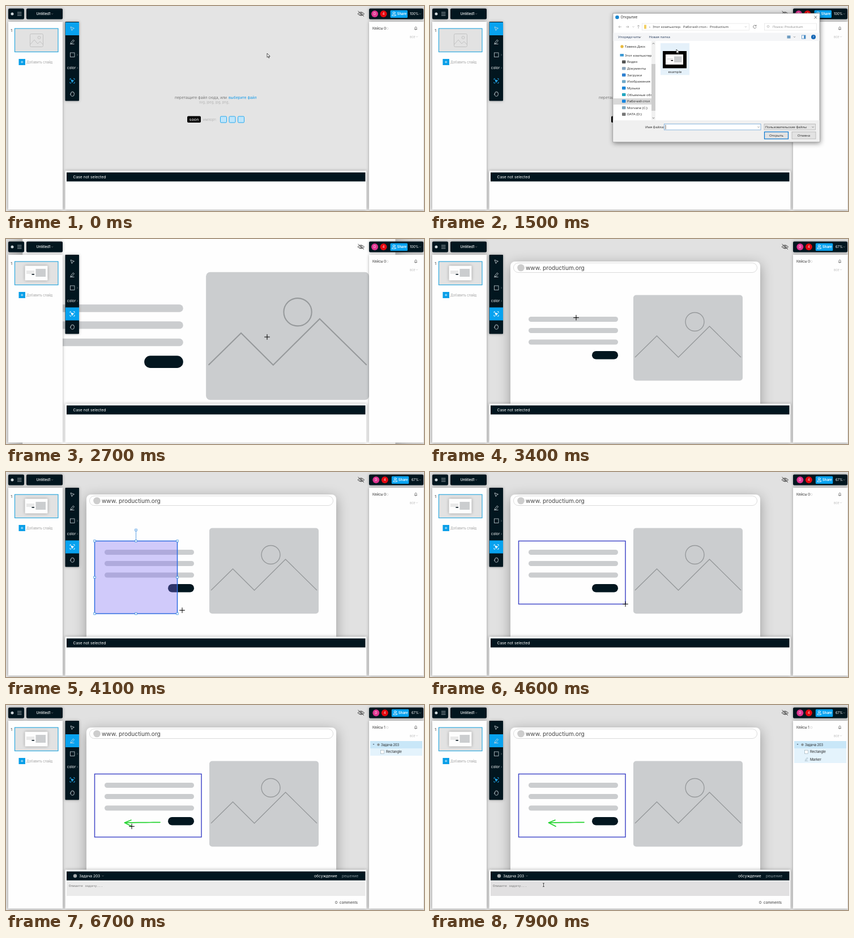
Animation, 738 px wide and 364 px high, one loop 8000 ms. Source, as an HTML page:

```html
<!DOCTYPE html>
<html lang="ru">
<head>
<meta charset="utf-8">
<title>Design review</title>
<style>
html, body { margin: 0; width: 100%; height: 100%; overflow: hidden; background: #e4e4e4; }
svg { display: block; width: 738px; height: 364px; font-family: Inter, Roboto, sans-serif; }
text { white-space: pre; }
#dialog { font-family: "Open Sans", "Noto Sans", sans-serif; }
.mono { font-family: "Liberation Mono", "DejaVu Sans Mono", monospace; }
.panel { filter: drop-shadow(0 0 2.5px rgba(0,0,0,.32)); }
.board { filter: drop-shadow(0 5px 11px rgba(0,0,0,.32)); }
.window { filter: drop-shadow(1px 2px 4px rgba(0,0,0,.45)); }
</style>
</head>
<body>
<svg id="stage" viewBox="0 0 738 364"></svg>
<script>
const LOOP = 8000, STEP = 100;
const DARK = '#02161f', BLUE = '#08a2ef', GREY = '#cbcdcf', INK = '#222', ICON = '#d3dadd';

// Markup helpers; text is placed by its vertical centre.
const rect = (x, y, w, h, fill, more = '') =>
  `<rect x="${x}" y="${y}" width="${w}" height="${h}" fill="${fill}" ${more}/>`;
const dot = (x, y, r, fill, more = '') =>
  `<circle cx="${x}" cy="${y}" r="${r}" fill="${fill}" ${more}/>`;
const line = (d, stroke = ICON, width = .8, more = '') =>
  `<path d="${d}" fill="none" stroke="${stroke}" stroke-width="${width}" ${more}/>`;
const text = (x, y, s, size, fill = INK, more = '') =>
  `<text x="${x}" y="${y + size * .36}" font-size="${size}" fill="${fill}" ${more}>${s}</text>`;
const group = (id, body, more = '') => `<g id="${id}" ${more}>${body}</g>`;
const chevron = (x, y, c = '#999') => line(`M${x - 1.5} ${y - .8}l1.5 1.5 1.5-1.5`, c, .6);
const MID = 'text-anchor="middle"';

function picture() {
  const bars = [142.5, 162.5, 183].map(y => rect(174, y - 4.5, 158, 9, GREY, 'rx="4.5"')).join('');
  return rect(142, 40, 441, 285, '#fefefe', 'rx="8" class="board"') +
    rect(147.5, 42.5, 430, 17, '#fff', 'rx="8.5" stroke="#c4c4c4" stroke-width=".6"') +
    dot(160.5, 51, 6.3, '#cdcdcd') +
    text(169, 51, 'www. productium.org', 10.2, '#444') +
    bars + rect(286, 199, 46, 14.5, DARK, 'rx="7.2"') +
    rect(359, 99.5, 193, 152, GREY, 'rx="5"') +
    dot(467.5, 147, 16.5, 'none', 'stroke="#96999b" stroke-width="1.4"') +
    line('M362 210L400.5 172 438.5 210 493.5 155 549 210', '#96999b', 1.4);
}

function dropZone() {
  const marks = [378, 393.5, 409].map(x =>
    rect(x + .5, 196, 11, 11, '#bfe5fa', 'rx="1.5" stroke="#25a9ef"')).join('');
  return text(298, 162.5, 'перетащите файл сюда, или', 6.7, '#777') +
    text(393, 162.5, 'выберите файл', 6.7, '#159bea') +
    text(341, 170.5, 'svg, jpeg, jpg, png,', 5.9, '#b5b5b5') +
    rect(320, 195.5, 24, 11.5, '#000', 'rx="2"') +
    text(332, 201, 'soon', 7.3, '#fff', MID) +
    text(348, 201.5, 'импорт:', 6.2, '#b4b4b4') + marks;
}

function topBars() {
  const bar = (x, w) => rect(x, 4.5, w, 19, DARK, 'rx="2"');
  return `<g class="panel">${bar(4, 28)}${bar(36, 64)}${bar(641, 96)}</g>` +
    dot(11, 14, 2.5, '#cfd7db') +
    line('M20 11.2h7.5M20 14h7.5M20 16.8h7.5', '#dce3e6', .7) +
    text(53.5, 14, 'Untitled1', 6, '#fff', 'font-weight="500"') + chevron(81.5, 14) +
    line('M621 14q5.5-6.5 11.5 0q-5.5 6-11.5 0M621.5 9l10.5 9.5', '#333', .9) +
    dot(626.8, 14, 2, 'none', 'stroke="#333" stroke-width=".8"') +
    group('team', dot(651, 14, 6, '#df3390') + text(651, 14, 'D', 5.5, '#fff', MID) +
      dot(666.5, 14, 6, '#e5080f') + text(666.5, 14, '4', 5.5, '#fff', MID) +
      rect(678.5, 7.5, 30.5, 13.5, BLUE, 'rx="1.5"') +
      dot(684.5, 12, 1.6, 'none', 'stroke="#fff" stroke-width=".8"') +
      line('M681.5 17.3q0-2.8 3-2.8t3 2.8zM686.5 10.5q2 1 .4 3M687.6 14.8q1.2.8 1.2 2.4', '#fff') +
      text(690.5, 14, 'Share', 6, '#fff', 'font-weight="600"')) +
    text(713, 14, '100%', 5.8, '#fff', 'id="zoomLabel"') + chevron(731, 14);
}

function slides() {
  return rect(4, 28, 96, 333.5, '#fefefe', 'class="panel"') +
    text(8.3, 43.5, '1', 6.8, '#333') +
    rect(15.5, 40, 76.5, 41.5, '#e2e2e2', 'stroke="#2da9df" stroke-width="1.2"') +
    group('emptyThumb', rect(42.5, 49.5, 23, 23, 'none', 'rx="2" stroke="#c2c2c2"') +
      line('M43 68l7-8 6 7 4-4 5 5', '#c2c2c2', 1) + dot(58.5, 56, 2.4, 'none', 'stroke="#c2c2c2"')) +
    group('fullThumb', rect(33.5, 47.5, 40, 26, '#fdfdfd', 'rx="1" class="panel"') +
      rect(52.5, 53, 17.5, 14, GREY) +
      line('M36 57h14M36 59h14M36 61h14', '#c9c9c9', .8) + rect(45.5, 62, 4.5, 1.6, DARK)) +
    rect(22.5, 94, 11.5, 11, '#0a9fe8') + line('M26 99.5h4.5M28.2 97.2v4.5', '#fff', .7) +
    text(36, 99.7, 'Добавить слайд', 5.8, '#a3a3a3');
}

function tools() {
  const arrow = (x, y) => `M${x} ${y}l6.5 2.6-2.9 1.2-1.2 2.9z`;
  return rect(104.5, 28, 24.5, 140.5, DARK, 'class="panel" rx="1"') +
    rect(105, 29, 24, 23, BLUE, 'id="activeTool"') +
    line(arrow(114, 37)) +
    line('M114.5 65l4-5 2 1.5-4 5-2.3.6zM113 67.5h7.5') +
    rect(113.5, 83, 7.5, 7.5, 'none', 'stroke="#c8d0d4" stroke-width=".8"') +
    line('M125.2 85.3l1.5 1.5-1.5 1.5', '#8d999e', .6) +
    text(107.7, 110, 'color', 6.5, '#fff') + line('M125.2 108.5l1.5 1.5-1.5 1.5', '#8d999e', .6) +
    group('regionTool', line('M113 131v-2h2M119 129h2v2M121 135v2h-2M115 137h-2v-2', 'currentColor', .9) +
      `<path d="${arrow(114.3, 130.2)}" fill="currentColor"/>`) +
    line('M114.5 157v-3q.8-1 1.4 0v-1.5q.8-1 1.5 0q.8-1 1.4 0v1.5q.9-1 1.5 0v3q0 3.2-2.5 3.2h-1.6q-1.2-.3-3-3.5q.2-1 1.3.3');
}

function cases() {
  return rect(641, 28, 96.5, 333.5, '#fefefe', 'class="panel"') +
    text(647, 40, 'Кейсы 0', 6, '#333', 'id="caseCount"') +
    dot(673.3, 40, 1.8, 'none', 'stroke="#ccc" stroke-width=".6"') +
    line('M721 41.5h5M722 41v-3q1.5-2.5 3 0v3M723 42.5h1', '#555', .7) +
    text(713, 54.5, 'все', 5.6, '#bbb') + chevron(725.5, 54.5, '#bbb') +
    group('caseRows', rect(643, 64, 92, 13, '#c9e7f8') + rect(643, 77, 92, 13, '#e4f3fc') +
      '<path d="M647.5 69h3l-1.5 2z" fill="#567"/>' + dot(657.5, 70.5, 2.2, '#8b9499') +
      text(662, 70.5, 'Задача 203', 5.7) +
      rect(661.5, 80.2, 6, 6, '#fff', 'stroke="#8fa4b0" stroke-width=".6"') +
      text(671, 83.3, 'Rectangle', 5.9)) +
    group('markerRow', rect(643, 90, 92, 13, '#e4f3fc') +
      line('M662.5 97.5l3.2-4 1.3 1-3.2 4zM661.5 99.3h6', '#8fa4b0', .6) +
      text(671, 96.5, 'Marker', 5.9));
}

function casePanel() {
  return rect(104.5, 292.5, 532, 69, '#fefefe', 'class="panel"') +
    rect(107, 295.5, 527.5, 16, DARK) +
    group('noCase', text(118.5, 303.5, 'Case not selected', 6.8, '#fff')) +
    group('withCase', dot(122, 303.5, 3.2, '#a6abad') +
      text(129, 303.5, 'Задача 203', 6.6, '#fff') + chevron(171, 303.5) +
      text(544, 303.5, 'обсуждение', 6.7, '#fff') + text(593, 303.5, 'решение', 6.7, '#87949a') +
      rect(107, 313, 527.5, 26, '#ebebeb', 'id="field"') +
      text(111, 321, 'Опишите задачу...', 5.9, '#777', 'class="mono"') +
      text(581, 350.5, '0  comments', 6.5, '#333'));
}

function dialog() {
  const places = ['Видео', 'Документы', 'Загрузки', 'Изображения', 'Музыка', 'Объемные объ',
    'Рабочий стол', 'Morvane (C:)', 'DATA (D:)'];
  const tints = ['#555', '#8aa5bd', '#2f80d0', '#6fa8c8', '#1d86d8', '#22a6c0', '#1685e0', '#7fa6bd', '#777'];
  const tree = places.map((name, i) => {
    const y = 99.3 + i * 11.62;
    return rect(339, y - 2.7, 6.5, 5.4, tints[i], 'rx="1"') + text(348, y, name, 6.1);
  }).join('');
  const crumb = (x, s) => text(x, 37, s, 6.1, '#333');
  const button = (x, s, more) => rect(x, 223.5, 42, 12.5, '#e2e2e2', more) + text(x + 21, 229.7, s, 6, INK, MID);
  return rect(323, 13, 365, 228.5, '#fff', 'class="window" stroke="#888" stroke-width=".7"') +
    dot(330.5, 20, 3.3, '#1a86cf') + text(336.5, 20, 'Открытие', 6.2) +
    line('M678.5 17.5l4.5 5M683 17.5l-4.5 5', '#333', .7) +
    line('M338 37h-5l2-2m-2 2l2 2M346 37h5l-2-2m2 2l-2 2M368 40v-6l-2 2m2-2l2 2', '#999', .7) +
    chevron(359, 37) +
    rect(374.5, 31, 189, 12, '#fff', 'stroke="#ddd" stroke-width=".6"') + rect(378, 33.5, 4, 7, '#f2cf62') +
    crumb(387, '›') + crumb(393, 'Этот компьютер') + crumb(441, '›') + crumb(447, 'Рабочий стол') +
    crumb(488, '›') + crumb(494, 'Productium') + chevron(557.5, 37) +
    line('M575.5 35.2a2.7 2.7 0 1 0 .5 2.2M576 33.5v2h-2', '#555', .7) +
    rect(590.5, 31, 92, 12, '#fff', 'stroke="#ddd" stroke-width=".6"') +
    dot(597, 36.3, 1.8, 'none', 'stroke="#999" stroke-width=".6"') + text(605, 37, 'Поиск: Productium', 6, '#888') +
    rect(323.4, 47.5, 364.3, 14.5, '#f4f5f7') +
    text(332, 55, 'Упорядочить', 6.1, '#24385a') + chevron(371, 55, '#444') + text(386.5, 55, 'Новая папка', 6.1, '#24385a') +
    rect(630.5, 52.5, 6, 5, '#6d9bc0') + chevron(643.5, 55, '#444') +
    rect(656.5, 52, 6.5, 6, '#fff', 'stroke="#4c8dc5" stroke-width=".8"') + rect(660, 52, 3, 6, '#4c8dc5') +
    dot(677, 55, 4, '#1265b5') + text(677, 55, '?', 6, '#fff', MID) +
    rect(323.4, 164, 67.6, 11, '#d9d9d9') +
    dot(339, 72, 2.7, '#e8b93c') + text(344, 72, 'Тавеко.Диск', 6.1) +
    rect(335.5, 85, 6.5, 4.5, '#3b98d3') + text(344, 87.5, 'Этот компьютер', 6) + tree +
    rect(391, 62.5, 7, 140, '#f0f0f0') + rect(391, 103, 7, 83, '#cdcdcd') +
    line('M392.8 67.5l1.7-1.7 1.7 1.7M392.8 198l1.7 1.7 1.7-1.7', '#555', .8) +
    rect(407, 66, 51, 56.5, '#e5f1fa', 'id="fileBack"') +
    rect(411, 80, 42, 30.5, '#000') + rect(416, 86, 31, 18, '#fff') + rect(431, 89.5, 13.5, 10.5, GREY) +
    line('M419 93.5h10M419 95h10', '#ccc', .7) + rect(425.5, 96, 3.5, 1.5, '#000') +
    text(432.5, 117, 'example', 6, INK, MID) +
    rect(323.4, 203, 364.3, 38.2, '#f0f0f0') + text(380, 214.7, 'Имя файла:', 6) +
    rect(413.5, 209.5, 170.5, 10.5, '#fff', 'stroke="#6ea5d8" stroke-width=".8"') + chevron(580, 215, '#444') +
    group('caret', line('M416 211v8', '#000', .6)) +
    group('fileName', rect(414.5, 211, 23, 7.7, '#0a73cf') + text(415, 214.7, 'example', 6, '#fff')) +
    rect(590, 209.5, 90.5, 10.5, '#e4e4e4', 'stroke="#adadad" stroke-width=".7"') +
    text(592, 214.7, 'Пользовательские файлы', 5.8) + chevron(676, 215, '#444') +
    button(590.5, 'Открыть', 'id="openButton" stroke="#0a78d1" stroke-width="1.2"') +
    button(639, 'Отмена', 'stroke="#adadad" stroke-width=".7"');
}

function region() {
  return rect(156.5, 122.5, 0, 0, 'none', 'id="area" stroke-width="1.5"') +
    group('handles', line('', '#3b8fe0', .8, 'id="stem"') +
      rect(-1.7, -1.7, 3.4, 3.4, '#fff', 'stroke="#3b8fe0" stroke-width=".8"').repeat(9));
}

const stroke = id => line('', '#20d32c', 1.7, `id="${id}" stroke-linecap="round" stroke-linejoin="round"`);

const cursors =
  '<path id="arrow" d="M0 0v7.2l1.7-1.5 1.2 2.6 1.1-.5-1.2-2.5h2.4z" fill="#fff" stroke="#111" stroke-width=".7"/>' +
  '<path id="hand" d="M-1-4q1-1 1.6 0v3l3.6 1v2.5l-1 3h-4l-3-4q0-1 1-.8l1.8 1.3z" fill="#fff" stroke="#0e4a7c" stroke-width=".9"/>' +
  line('M-4.8 0h9.6M0-4.8v9.6', '#000', 1, 'id="cross"') +
  line('M-1.5-3h3M0-3v6M-1.5 3h3', '#222', .7, 'id="beam"');

const stage = document.getElementById('stage');
stage.innerHTML = rect(0, 0, 738, 364, '#e4e4e4', 'id="backdrop"') +
  group('drop', dropZone()) + group('board', picture()) + region() +
  stroke('shaft') + stroke('head') +
  casePanel() + slides() + cases() + tools() + topBars() +
  group('dialog', dialog()) + group('pointer', cursors);

const $ = {};
stage.querySelectorAll('[id]').forEach(el => $[el.id] = el);
const set = (id, attrs) => { for (const k in attrs) $[id].setAttribute(k, attrs[k]); };
const show = (id, on) => { $[id].style.display = on ? '' : 'none'; };

// Pointer route: time, x, y
const ROUTE = [[0, 461, 84], [100, 461, 84], [600, 418, 162], [900, 418, 162], [1400, 435, 77], [1700, 435, 77],
  [2300, 603, 233], [2500, 603, 233], [2700, 461, 174], [3200, 461, 174], [3500, 156.5, 122.5],
  [3600, 156.5, 122.5], [4000, 302.5, 251.5], [4100, 311, 245.5], [4300, 345, 234.5], [4600, 345, 234.5],
  [5000, 117, 63], [5100, 117, 63], [5500, 250.5, 192], [5800, 272, 208.3], [6300, 209.5, 209],
  [6400, 221, 204.3], [6500, 209.5, 209], [6700, 222, 215.5], [7200, 222, 215.5], [7700, 200.5, 319.5]];
const ZOOM = [[0, 1], [2800, 1], [3200, .67]];

function at(table, t) {
  const i = table.findIndex(row => row[0] > t);
  if (i < 0) return table.at(-1).slice(1);
  if (i === 0) return table[0].slice(1);
  const a = table[i - 1], b = table[i], k = (t - a[0]) / (b[0] - a[0]);
  return a.slice(1).map((v, j) => v + (b[j + 1] - v) * k);
}

// The dragged corner trails the pointer by one step.
function drawRegion(t) {
  const begun = t > 3700, live = t < 4600;
  show('area', begun);
  show('handles', begun && live);
  if (!begun) return;
  const [x, y] = at(ROUTE, Math.min(t - STEP, 4300));
  const w = Math.max(0, x - 156.5), h = Math.max(0, y - 122.5);
  set('area', { width: w, height: h, fill: live ? 'rgba(125,108,240,.36)' : 'none', stroke: live ? '#2d6be0' : '#4248c8' });
  const mx = 156.5 + w / 2;
  set('stem', { d: `M${mx} 122.5v-19.5` });
  const spots = [[mx, 103]];
  for (const i of [0, .5, 1]) for (const j of [0, .5, 1])
    if (i !== .5 || j !== .5) spots.push([156.5 + w * i, 122.5 + h * j]);
  $.handles.querySelectorAll('rect').forEach((el, i) =>
    el.setAttribute('transform', `translate(${spots[i]})`));
}

function drawArrow(t) {
  const path = (from, to) => {
    const pts = [];
    for (let s = from; s <= Math.min(t, to); s += STEP) pts.push(at(ROUTE, s));
    return pts.length > 1 ? 'M' + pts.join('L') : '';
  };
  set('shaft', { d: path(5800, 6300) });
  set('head', { d: path(6400, 6700) });
}

function draw(t) {
  const loaded = t >= 2600, picked = t >= 1700, task = t >= 4700, pen = t >= 5100;
  const [zoom] = at(ZOOM, t), scale = zoom / .67;
  show('drop', !loaded);
  show('board', loaded);
  show('emptyThumb', !loaded);
  show('fullThumb', loaded);
  set('backdrop', { fill: loaded ? '#e1e1e1' : '#e4e4e4' });
  set('board', { transform: `translate(371 182) scale(${scale}) translate(-371 -182)` });
  $.zoomLabel.textContent = Math.round(zoom * 100) + '%';
  set('zoomLabel', { x: zoom < 1 ? 716 : 713 });
  set('team', { transform: `translate(${zoom < 1 ? 2.3 : 0})` });

  show('dialog', t >= 800 && t < 2500);
  show('caret', !picked);
  show('fileName', picked);
  set('fileBack', { fill: picked ? '#d9d9d9' : t >= 1300 ? '#e5f1fa' : '#fff' });
  set('openButton', { fill: t >= 2200 ? '#c5e1f5' : '#e2e2e2' });

  set('activeTool', { y: pen ? 52 : loaded ? 121.5 : 29 });
  $.regionTool.style.color = loaded && !pen ? '#fff' : '#25aef5';
  $.caseCount.textContent = 'Кейсы ' + (task ? 1 : 0);
  show('caseRows', task);
  show('markerRow', t >= 7000);
  show('noCase', !task);
  show('withCase', task);
  set('field', { fill: t >= 7500 ? '#e1e0e1' : '#ebebeb' });

  drawRegion(t);
  drawArrow(t);

  const overLink = t >= 600 && t < 800, overOpen = t >= 2200 && t < 2500, overTools = t >= 4900 && t < 5200;
  const kind = overLink || overOpen || overTools ? 'hand' : t >= 7500 ? 'beam' : loaded ? 'cross' : 'arrow';
  for (const id of ['arrow', 'hand', 'cross', 'beam']) show(id, id === kind);
  set('pointer', { transform: `translate(${at(ROUTE, t)})` });
}

function tick() {
  draw(Math.floor(performance.now() % LOOP / STEP) * STEP);
  requestAnimationFrame(tick);
}
tick();
</script>
</body>
</html>
```
